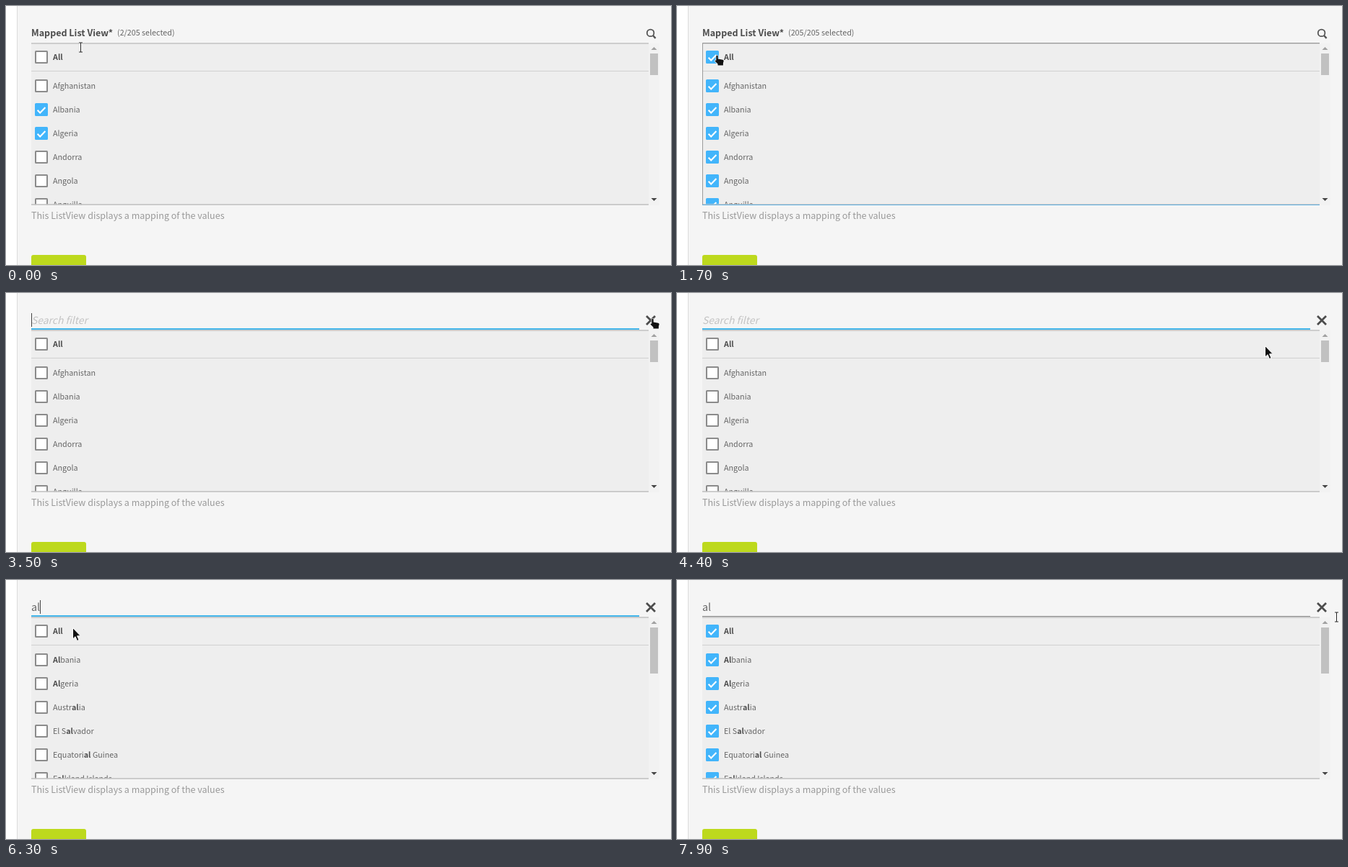
Write an HTML page that moves like this. It is 921 px wide and 360 px high and loops after 8 s.

```html
<!DOCTYPE html>
<html lang="en">
<head>
<meta charset="utf-8">
<title>Mapped list view</title>
<style>
  html, body { margin: 0; width: 100%; height: 100%; overflow: hidden; background: #fff; }
  svg { display: block; }
  text {
    font-family: "Noto Sans CJK JP", "Noto Sans CJK SC", "Noto Sans CJK KR", "Noto Sans", sans-serif;
    white-space: pre;
  }
  .s12 { font-size: 10.74px; fill: #666; }
  .s14 { font-size: 12.53px; fill: #999; }
  .s16 { font-size: 14.32px; fill: #666; }
  .b { font-weight: 700; }
  .dark { fill: #4c4c4c; }
  .hint { font-size: 13.9px; font-style: italic; fill: #c3c3c3; }
</style>
</head>
<body>
<svg width="921" height="360" viewBox="0 0 921 360">
  <defs><clipPath id="view"><rect x="35" y="52" width="855" height="224.5"/></clipPath></defs>
  <rect x="15" width="906" height="360" fill="#f5f5f5"/>
  <rect x="15" width="1" height="360" fill="#dcdcdc"/>
  <rect x="35" y="346" width="76" height="30" rx="3" fill="#bdd91d"/>
  <text class="s14" x="35" y="296">This ListView displays a mapping of the values</text>

  <g id="title">
    <text class="s14 b dark" x="35" y="42">Mapped List View*</text>
    <text id="count" class="s12" x="154" y="41"></text>
    <g fill="none" stroke="#555">
      <circle cx="892.6" cy="37.4" r="4.8" stroke-width="1.8"/>
      <path d="M896 41L899.6 44.8" stroke-width="2.4"/>
    </g>
  </g>
  <g id="search">
    <text id="hint" class="hint" x="35" y="43">Search filter</text>
    <text id="query" class="s16" x="35" y="43"></text>
    <rect id="caret" y="28" width="1" height="19" fill="#444"/>
    <path d="M887 32L899 44M899 32L887 44" stroke="#4c4c4c" stroke-width="2.8"/>
  </g>

  <rect x="35" y="52" width="855" height="225" fill="#eee"/>
  <rect x="35" y="51" width="855" height="2" fill="#cdcdcd"/>
  <rect id="line" x="35" width="842"/>
  <g clip-path="url(#view)" id="rows"></g>
  <rect x="35" y="90" width="855" height="1" fill="#d0d0d0"/>
  <rect x="35" y="275" width="855" height="2" fill="#c6c6c6" opacity=".85"/>
  <g id="ring">
    <path d="M35.5 276V51.5H890" fill="none" stroke="#9b9b9b"/>
    <path d="M35 276.5H890" stroke="#5fb0e2"/>
  </g>

  <rect x="890" y="52" width="15" height="225" fill="#f2f2f2"/>
  <path d="M893.5 61L897.5 57L901.5 61Z" fill="#a0a0a0"/>
  <path d="M893.5 267L897.5 271L901.5 267Z" fill="#454545"/>
  <rect id="thumb" x="892" y="66" width="11" fill="#c1c1c1"/>

  <g id="a" stroke-linejoin="round">
    <path d="M0 0V15.5L3.5 12.2L6 18L8.6 16.9L6.1 11.3H10.8Z" fill="#111" stroke="#fff" stroke-width="1"/>
  </g>
  <g id="h" stroke-linejoin="round">
    <path d="M-1.2 1Q0 -.8 1.2 1V5L8 6.2Q9.3 6.6 9.2 8L8.4 11V14H1V12L-2.8 8.2Q-3 6.3 -1.2 7.2Z"
          fill="#111" stroke="#fff" stroke-width="1.4" paint-order="stroke"/>
  </g>
  <g id="i" fill="none">
    <path d="M-2.5 -6.5H2.5M0 -6.5V6.5M-2.5 6.5H2.5" stroke="#fff" stroke-width="2.6"/>
    <path d="M-2.5 -6.5H2.5M0 -6.5V6.5M-2.5 6.5H2.5" stroke="#222" stroke-width="1"/>
  </g>
</svg>
<script>
const LOOP = 8000, STEP = 100;
const $ = id => document.getElementById(id);
const show = (id, on) => $(id).setAttribute('visibility', on ? 'inherit' : 'hidden');
const within = (t, from, to) => t >= from && t < to;

const countries = ['Afghanistan', 'Albania', 'Algeria', 'Andorra', 'Angola', 'Anguilla'];
const matches = ['Albania', 'Algeria', 'Australia', 'El Salvador', 'Equatorial Guinea', 'Falkland Islands'];
const preset = ['Albania', 'Algeria'];

// Pointer path: time, x, y, shape (a = arrow, h = hand, i = I-beam, n = none)
const path = [
  [0, 103, 57, 'i'], [100, 101, 60, 'a'], [400, 60, 80, 'h'], [600, 56, 84, 'h'],
  [700, 56, 84, 'h'], [800, 57, 79, 'h'], [1400, 57, 79, 'h'], [1600, 55, 68, 'h'],
  [2000, 55, 68, 'h'], [2100, 80, 62, 'a'], [2400, 565, 40, 'a'], [2500, 565, 40, 'a'],
  [2600, 722, 44, 'a'], [2800, 844, 43, 'a'], [3000, 844, 43, 'a'], [3200, 900, 36, 'h'],
  [3300, 895, 35, 'h'], [3500, 895, 35, 'h'], [3600, 880, 44, 'a'], [3900, 816, 65, 'a'],
  [4000, 815, 71, 'a'], [4300, 815, 71, 'a'], [4400, 814, 73, 'a'], [5400, 814, 73, 'a'],
  [5800, 420, 4, 'a'], [6100, 104, 62, 'a'], [6200, 104, 62, 'a'], [6300, 92, 66, 'a'],
  [6500, 54, 69, 'h'], [6800, 54, 69, 'h'], [6900, 150, 40, 'a'], [7000, 320, 18, 'a'],
  [7100, 535, 62, 'a'], [7200, 897, 67, 'a'], [7300, 0, 0, 'n'], [7800, 908, 52, 'i'],
  [7900, 913, 51, 'i']
];

const GREY = [139, 139, 139], BLUE = [66, 181, 251], WHITE = [255, 255, 255];
const mix = (a, b, p) => `rgb(${a.map((v, i) => Math.round(v + (b[i] - v) * p))})`;
const fade = (t, start) => Math.min(1, Math.max(0, (t - start + 30) / 200));

function checkbox(y, level, ticked, focused) {
  const edge = focused ? mix(BLUE, BLUE, 0) : mix(GREY, BLUE, level);
  const box = `<rect x="41" y="${y - 8}" width="16" height="16" rx=".6" stroke-width="2"
    fill="${mix(WHITE, BLUE, level)}" stroke="${edge}"/>`;
  const tick = `<path d="M43.6 ${y + .8}l3.6 3.6l7.2 -7.4" fill="none" stroke="#fff" stroke-width="2.1"/>`;
  return box + (ticked ? tick : '');
}

function drawRows(t, filtered) {
  const ticked = within(t, 900, 1900) || t >= 6700;
  const level = t < 1900 ? fade(t, 900) : t < 6600 ? 1 - fade(t, 1900) : fade(t, 6700);
  const focused = within(t, 1900, 3400);
  let out = checkbox(71, level, ticked, focused) + '<text class="s12 b dark" x="65" y="75">All</text>';
  (filtered ? matches : countries).forEach((name, i) => {
    const y = 111 + 33 * i;
    const early = t < 1900 && preset.includes(name);
    const label = filtered ? name.replace(/al/i, '<tspan class="b dark">$&</tspan>') : name;
    out += checkbox(y, early ? 1 : level, ticked || early, false) +
      `<text class="s12" x="65" y="${y + 4}">${label}</text>`;
  });
  $('rows').innerHTML = out;
}

function drawHeader(t) {
  const open = t >= 3400, typing = open && t < 6600;
  show('title', !open);
  show('search', open);
  $('count').textContent = t < 900 ? '(2/205 selected)' : t < 1900 ? '(205/205 selected)' : '';

  const query = t < 5300 ? '' : t < 5400 ? 'a' : 'al';
  $('query').textContent = query;
  show('hint', open && !query);
  const blinkOff = within(t, 4200, 4900) || within(t, 5800, 6300);
  show('caret', typing && !blinkOff);
  $('caret').setAttribute('x', [35, 43, 47][query.length]);

  show('line', open);
  $('line').setAttribute('y', typing ? 49 : 50);
  $('line').setAttribute('height', typing ? 2 : 1);
  $('line').setAttribute('fill', typing ? '#42b5ea' : '#8c8c8c');
}

function drawPointer(t) {
  const k = path.findLastIndex(p => p[0] <= t);
  const [t0, x0, y0, shape] = path[k];
  const [t1, x1, y1] = path[k + 1] || [LOOP, x0, y0];
  const p = (t - t0) / (t1 - t0);
  for (const id of ['a', 'h', 'i']) show(id, id === shape);
  if (shape !== 'n') {
    const x = Math.round(x0 + (x1 - x0) * p), y = Math.round(y0 + (y1 - y0) * p);
    $(shape).setAttribute('transform', `translate(${x + .5} ${y + .5})`);
  }
}

function draw(t) {
  const filtered = t >= 5500;
  drawHeader(t);
  drawRows(t, filtered);
  $('thumb').setAttribute('height', filtered ? 64 : 30);
  show('ring', within(t, 800, 900) || within(t, 1700, 1900) || within(t, 6600, 6700));
  drawPointer(t);
}

let last = -1;
function tick(now) {
  const t = Math.floor((now % LOOP) / STEP) * STEP;
  if (t !== last) draw(last = t);
  requestAnimationFrame(tick);
}
draw(0);
requestAnimationFrame(tick);
</script>
</body>
</html>
```
